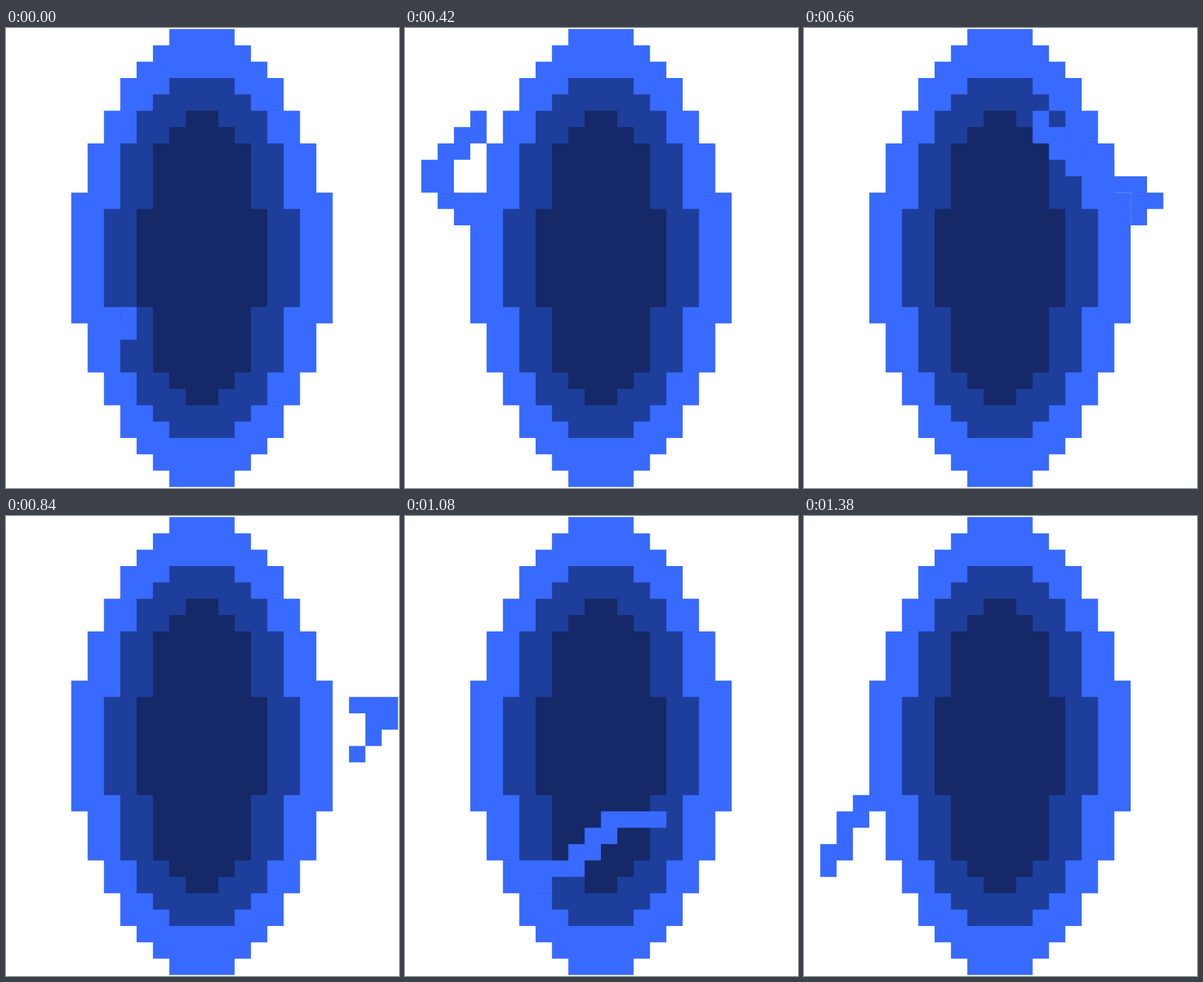
Recreate the animation shown at these times as an HTML page with a canvas. Size 692 by 809 pixels, loop 1.44 s.

```html
<!DOCTYPE html>
<html lang="en">
<head>
<meta charset="utf-8">
<title>Pixel portal</title>
<style>
  html, body { margin: 0; width: 100%; height: 100%; overflow: hidden; background: #fff; }
  canvas { display: block; }
</style>
</head>
<body>
<canvas id="stage" width="692" height="809"></canvas>
<script>
const ctx = document.getElementById('stage').getContext('2d');
const CELL = 28.77, CX = 12, CY = 14;
const STEP = 60, STEPS = 24, TRAIL = 2.4;
const BRIGHT = '#386aff';

// Pixel ellipses: radii in cells and a rounding bias.
const ovals = [
  { color: BRIGHT, rx: 9, ry: 14.2, bias: -0.7 },
  { color: '#1d3e9b', rx: 6.6, ry: 11.2, bias: -0.28 },
  { color: '#152968', rx: 4.5, ry: 9.2, bias: -0.17 }
];

// The spark coils clockwise around the rim: [step, x, y] at its turns.
const turns = [
  [-1, 6.5, 18.7], [1.6, 8.4, 16.5], [3, 8.4, 14.8],
  [4.6, 4.4, 11.6], [6, 1.5, 8.7], [7, 4.8, 5.4],
  [7.8, 8, 3.4], [8.6, 14.3, 5.4], [9.6, 16.9, 8.1],
  [10.7, 21.3, 10.5], [11, 20.5, 11.5], [12.5, 23.4, 11.8],
  [13.6, 22.9, 13.1], [14.2, 20.9, 15.1], [14.8, 19.6, 18.4],
  [15.2, 17.6, 15.6], [15.5, 16.3, 18.1], [16, 13.4, 18.6],
  [17.6, 9.6, 21.3], [19, 5.4, 25.3], [19.5, 6.5, 23.6],
  [20, 3.4, 23.6], [20.6, 1.4, 21.5], [23, 3.5, 17.4]
];

function sparkAt(t) {
  const i = Math.max(1, turns.findIndex(([time]) => time >= t));
  const [t0, x0, y0] = turns[i - 1], [t1, x1, y1] = turns[i];
  const k = (t - t0) / (t1 - t0);
  return [x0 + (x1 - x0) * k, y0 + (y1 - y0) * k];
}

function block(col, row, w = 1, h = 1) {
  ctx.rect(col * CELL - 0.15, row * CELL + 1.7, w * CELL, h * CELL);
}

function fill(color, trace) {
  ctx.fillStyle = color;
  ctx.beginPath();
  trace();
  ctx.fill();
}

function traceOval({ rx, ry, bias }) {
  for (let row = 0; row < CY; row++) {
    const u = (CY - row - 0.5) / ry;
    const half = Math.floor(rx * Math.sqrt(Math.max(0, 1 - u * u)) + bias);
    if (half > 0) block(CX - half, row, 2 * half, 2 * (CY - row));
  }
}

function traceSpark(step) {
  const cells = new Set();
  const tail = Math.max(turns[0][0], step - TRAIL);
  for (let i = 0; i <= 240; i++) {
    const t = tail + (step - tail) * i / 240;
    cells.add(sparkAt(t).map(Math.floor).join());
  }
  for (const cell of cells) block(...cell.split(',').map(Number));
}

function draw(step) {
  ctx.clearRect(0, 0, 692, 809);
  for (const oval of ovals) fill(oval.color, () => traceOval(oval));
  fill(BRIGHT, () => traceSpark(step));
}

const start = performance.now();
function tick() {
  const time = Math.max(0, performance.now() - start);
  draw(Math.floor(time / STEP) % STEPS);
  requestAnimationFrame(tick);
}
tick();
</script>
</body>
</html>
```
